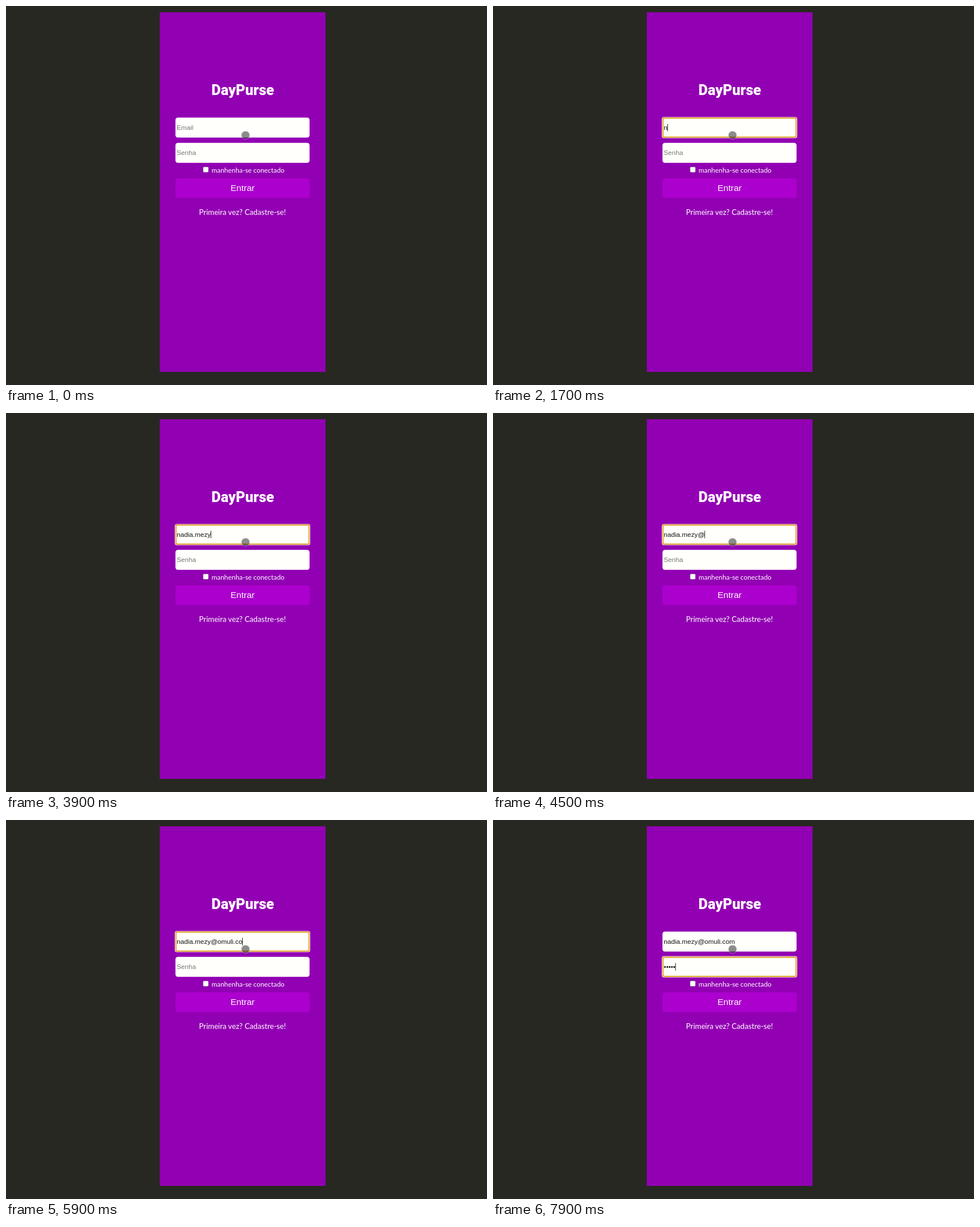
Animation, 843 px wide and 664 px high, one loop 8000 ms. Source, as an HTML page:

```html
<!DOCTYPE html>
<html lang="pt">
<head>
<meta charset="utf-8">
<title>Login</title>
<style>
  html, body { margin: 0; width: 100%; height: 100%; overflow: hidden; background: #272822; }
  svg { display: block; }
  .field { font: 11.67px "Liberation Sans", Arial, sans-serif; fill: #141414; }
  .hint { fill: #777; }
  .soft { font-family: Lato, sans-serif; fill: #fff; }
  .brand { font: 900 25.3px Roboto, sans-serif; fill: #fff; }
  .button { font: 15.5px "Liberation Sans", Arial, sans-serif; fill: #fff; }
</style>
</head>
<body>
<svg width="843" height="664" viewBox="0 0 843 664">
  <rect width="843" height="664" fill="#272822"/>
  <rect x="269.5" y="11" width="290.5" height="630" fill="#9200b3"/>
  <text class="brand" x="415" y="156" text-anchor="middle">DayPurse</text>

  <g id="mail"></g>
  <g id="pass"></g>

  <rect x="345.5" y="282" width="9.3" height="9.3" rx="1.5" fill="#fff" stroke="#777" stroke-width=".6"/>
  <text class="soft" x="360.3" y="291.5" font-size="11.9">manhenha-se conectado</text>
  <rect x="297" y="302" width="235.5" height="34.5" rx="4.4" fill="#ac00ce"/>
  <text class="button" x="414.6" y="323.5" text-anchor="middle">Entrar</text>
  <text class="soft" x="414.4" y="366" font-size="13.2" text-anchor="middle">Primeira vez? Cadastre-se!</text>

  <circle id="pointer" cx="419.8" cy="226.4" r="7.2" fill="#2d2d2d" fill-opacity=".55" stroke="#ddd" stroke-opacity=".55" stroke-width=".9"/>
</svg>
<script>
const LOOP = 8000;
const MAIL = "nadia.mezy@omuli.com";
const LEFT = 299.3;

// [time, characters typed]
const mailKeys = [[1700, 1], [2000, 2], [2200, 3], [2400, 4], [3000, 5], [3200, 6],
  [3400, 7], [3500, 8], [3700, 9], [3900, 10], [4300, 11], [4600, 12], [4800, 13],
  [5000, 14], [5200, 15], [5400, 16], [5800, 18], [5900, 19], [6300, 20]];
const passKeys = [[7300, 2], [7500, 3], [7700, 4], [7900, 5]];

function add(parent, tag, attrs) {
  const el = document.createElementNS("http://www.w3.org/2000/svg", tag);
  for (const k in attrs) el.setAttribute(k, attrs[k]);
  return parent.appendChild(el);
}

function makeField(id, top, hint) {
  const g = document.getElementById(id);
  add(g, "rect", { x: 297, y: top, width: 235, height: 35, rx: 4.2, fill: "#fffffb" });
  const ring = add(g, "g", { fill: "none" });
  add(ring, "rect", { x: 296.5, y: top - .5, width: 236, height: 36, rx: 3, stroke: "#fff6df", "stroke-width": 1.2 });
  add(ring, "rect", { x: 297.9, y: top + .9, width: 233.2, height: 33.2, rx: 2.2, stroke: "#dc9c12", "stroke-width": 1.7 });
  const text = add(g, "text", { x: LEFT, y: top + 21 });
  const caret = add(g, "rect", { y: top + 11, width: 1, height: 13, fill: "#111" });

  return (value, focused) => {
    text.setAttribute("class", value ? "field" : "field hint");
    text.textContent = value || hint;
    const width = value ? text.getComputedTextLength() : 0;
    caret.setAttribute("x", LEFT - .3 + width);
    ring.style.display = caret.style.display = focused ? "" : "none";
  };
}

const typed = (keys, t) => keys.reduce((n, [at, count]) => t >= at ? count : n, 0);

const mail = makeField("mail", 195.5, "Email");
const pass = makeField("pass", 239.7, "Senha");
const pointer = document.getElementById("pointer");

function draw(t) {
  mail(MAIL.slice(0, typed(mailKeys, t)), t >= 800 && t < 6300);
  pass("•".repeat(typed(passKeys, t)), t >= 6300);
  pointer.setAttribute("cy", t >= 4100 && t < 4500 ? 227.4 : 226.4);
}

const start = performance.now();
function tick() {
  draw((performance.now() - start) % LOOP);
  requestAnimationFrame(tick);
}
tick();
</script>
</body>
</html>
```
